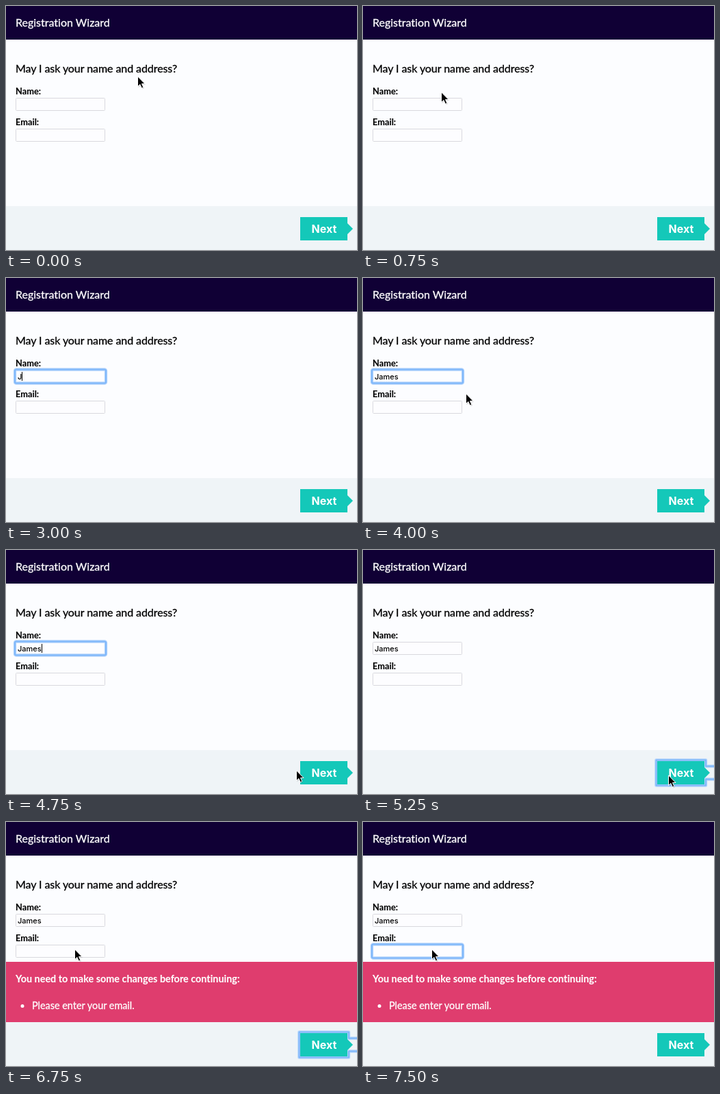
Write an HTML page that moves like this. It is 513 by 356 pixels and loops after 8 s.

```html
<!DOCTYPE html>
<html lang="en">
<head>
<meta charset="utf-8">
<title>Registration Wizard</title>
<style>
  html, body { margin: 0; width: 100%; height: 100%; overflow: hidden; background: #fcfdff; }
  svg { display: block; width: 513px; height: 356px; }
  text { font: 16px Lato, sans-serif; font-variant-ligatures: none; stroke: #000; stroke-width: .3px; }
  .title { fill: #fff; stroke: #fff; }
  .question { letter-spacing: -.07px; }
  .label { font-size: 12.8px; font-weight: 700; stroke-width: .1px; }
  .error text { font-size: 14.4px; fill: #fff; stroke: #fff; }
  .error .strong { font-weight: 700; stroke-width: .1px; }
  .button { font: 700 16px Inter, sans-serif; fill: #fff; stroke: none; }
  .value { font: 500 11px Inter, sans-serif; stroke: none; }
  .field { fill: #fdfdff; stroke: #d9d9de; }
  .ring { fill: none; }
  .ring .glow { stroke: #b5d5fc; stroke-width: 4.500; }
  .ring .core { stroke: #7db6fa; stroke-width: 2; }
</style>
</head>
<body>
<svg viewBox="0 0 513 356">
  <defs>
    <rect id="outline" x="13" width="133" height="20" rx="2"/>
    <path id="buttonOutline" d="M518 315.500H501V306.500H428.500V343.500H501V334.500H518" stroke-linejoin="round"/>
  </defs>
  <rect width="513" height="356" fill="#fcfdff"/>
  <rect width="513" height="49" fill="#100035"/>
  <text class="title" x="14" y="30">Registration Wizard</text>
  <text class="question" x="14" y="97">May I ask your name and address?</text>

  <text class="label" x="14" y="129">Name:</text>
  <rect class="field" x="14.500" y="134.500" width="130" height="18" rx="1"/>
  <g class="ring" id="nameRing" transform="translate(0 133.500)">
    <use href="#outline" class="glow"/><use href="#outline" class="core"/>
  </g>
  <text class="value" id="name" x="17" y="148"></text>

  <text class="label" x="14" y="174">Email:</text>
  <rect class="field" x="14.500" y="179.500" width="130" height="18" rx="1"/>
  <g class="ring" id="emailRing" transform="translate(0 178.500)">
    <use href="#outline" class="glow"/><use href="#outline" class="core"/>
  </g>
  <rect id="caret" width="1" height="13"/>

  <g class="error" id="error">
    <rect y="204" width="513" height="88" fill="#df3d6e"/>
    <text class="strong" x="14" y="234">You need to make some changes before continuing:</text>
    <circle cx="24" cy="268.500" r="2.500" fill="#fff"/>
    <text x="38" y="273">Please enter your email.</text>
  </g>

  <rect y="292" width="513" height="64" fill="#eff4f7"/>
  <g class="ring" id="buttonRing">
    <use href="#buttonOutline" class="glow"/><use href="#buttonOutline" class="core"/>
  </g>
  <path d="M430 308H499V317L507 325L499 333V342H430Z" fill="#14c8b9"/>
  <text class="button" x="446.500" y="331">Next</text>

  <g id="cursor">
    <path d="M1.500 2.500V17L5 14L7.500 19L10 18L8 13H12Z" fill="#000" opacity=".15"/>
    <path d="M.5 .8V15.500L3.900 12.400L6.300 17.800L8.800 16.700L6.500 11.500H11Z" stroke="#fff"/>
  </g>
</svg>
<script>
const LOOP = 8000, STEP = 250;
const $ = id => document.getElementById(id);

// Pointer stops, one per step, from the given start time
const moves = [
  [0, [192, 102], [177, 106], [146, 114], [114, 125], [95, 134], [87, 138], [88, 141], [89, 142]],
  [4000, [150, 168], [237, 222], [345, 285], [424, 321], [446, 330], [446, 328], [446, 328],
         [400, 306], [252, 241], [126, 190], [104, 186], [100, 185]]
];

const show = (id, visible) => $(id).setAttribute('visibility', visible ? 'visible' : 'hidden');
const between = (t, from, to) => t >= from && t < to;

function draw(t) {
  const [start, ...stops] = moves[t < 4000 ? 0 : 1];
  const [x, y] = stops[Math.min((t - start) / STEP, stops.length - 1)];
  $('cursor').setAttribute('transform', `translate(${x} ${y})`);
  show('cursor', !between(t, 2250, 4000));

  const typed = t < 3000 ? 0 : t < 3250 ? 1 : t < 3500 ? 3 : 5;
  $('name').textContent = 'James'.slice(0, typed);

  const inName = between(t, 2000, 5250), inEmail = t >= 7000;
  show('nameRing', inName);
  show('emailRing', inEmail);
  show('buttonRing', between(t, 5250, 7000));
  show('error', t >= 5500);

  const lit = between(t, 2000, 4000) || between(t, 4500, 5000) || between(t, 7000, 7500);
  show('caret', lit);
  $('caret').setAttribute('x', typed && inName ? 17 + Math.round($('name').getComputedTextLength()) : 17);
  $('caret').setAttribute('y', inEmail ? 182 : 137);
}

function tick() {
  const t = performance.now() % LOOP;
  draw(Math.floor(t / STEP) * STEP);
  requestAnimationFrame(tick);
}
tick();
</script>
</body>
</html>
```
